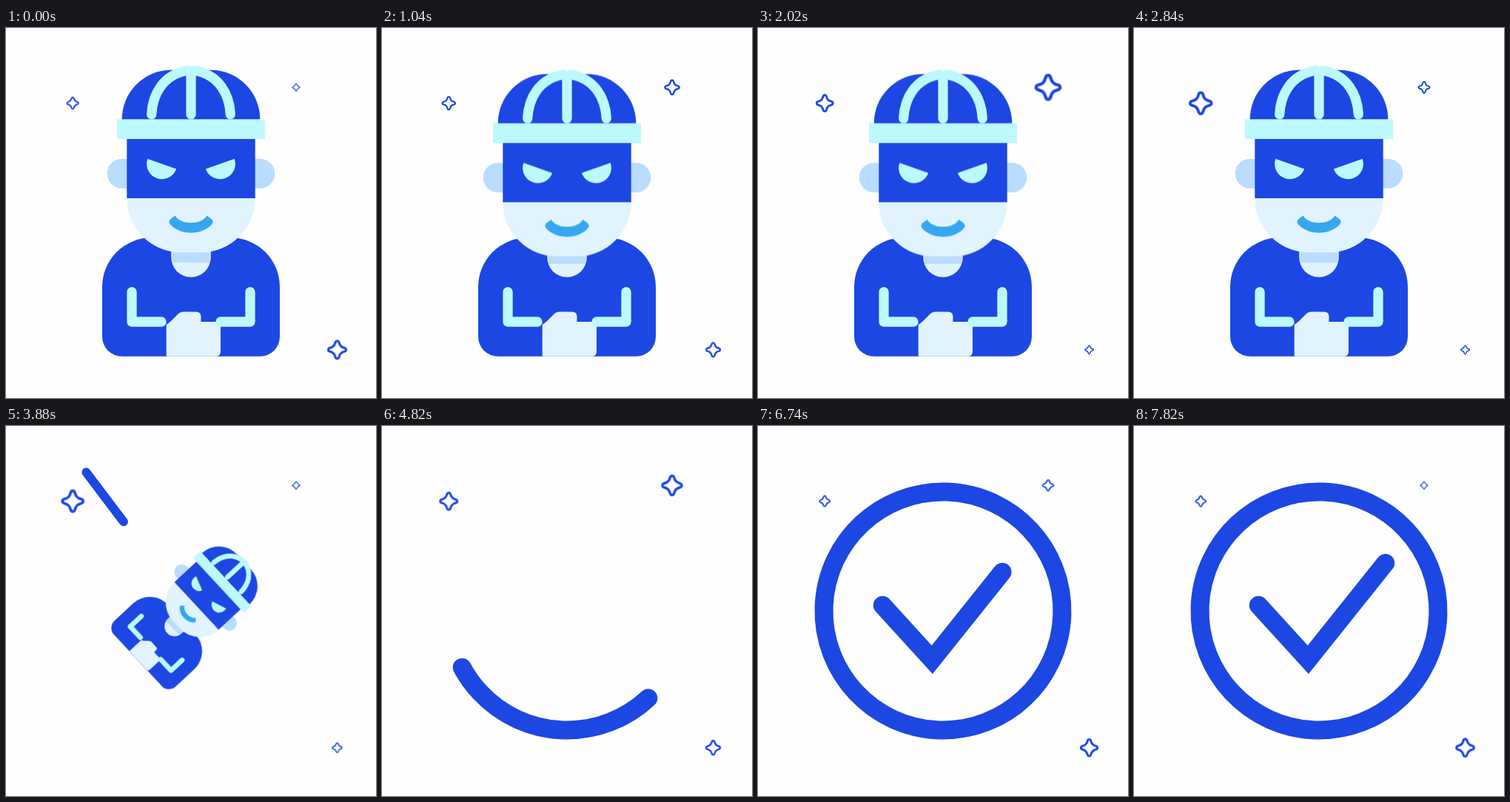
Write an HTML page that moves like this. It is 500x500 px and loops after 7.84 s.

```html
<!DOCTYPE html>
<html lang="en">
<head>
<meta charset="utf-8">
<title>Thief caught</title>
<style>
  :root { --blue: #1c47e3; --cyan: #bef8ff; --skin: #e0f3ff; --shade: #b9dcff; }
  html, body { margin: 0; width: 100%; height: 100%; overflow: hidden; background: #fefefe; }
  svg { display: block; width: 100%; height: 100%; }
  .blue { fill: var(--blue); }
  .cyan { fill: var(--cyan); }
  .skin { fill: var(--skin); }
  .shade { fill: var(--shade); }
  .line { fill: none; stroke: var(--blue); stroke-linecap: round; }
  .trim { stroke: var(--cyan); stroke-width: 13.3; stroke-linejoin: round; }

  .thief, .head, .collar, .streak, .ring, .check {
    animation: 7.84s linear infinite;
  }
  .thief { transform-origin: 250px 250px; animation-name: vanish; }
  .head { --nod: 5.4px; animation-name: nod; }
  .collar { --nod: 1.7px; animation-name: nod; }
  .streak { stroke-width: 12; animation-name: slash; }
  .ring { stroke-width: 25; stroke-dasharray: 1 2; animation-name: ring; }
  .check { stroke-width: 25; stroke-dasharray: 1 2; animation-name: check; }

  @keyframes nod {
    0%, 18.11%, 36.22%, 100% { transform: none; animation-timing-function: ease-in-out; }
    6.34%, 13.4%, 24.45%, 31.5% { transform: translateY(var(--nod)); animation-timing-function: ease-in-out; }
  }
  @keyframes vanish {
    0%, 41.07% { transform: rotate(0deg) scale(1); animation-timing-function: ease-in-out; }
    44.39% { transform: rotate(0deg) scale(1.05); animation-timing-function: cubic-bezier(.37, 0, .63, 1); }
    54.39%, 100% { transform: rotate(91deg) scale(0); }
  }
  @keyframes slash {
    0%, 48.2% { visibility: hidden; stroke-dasharray: 0 2; stroke-dashoffset: 0; }
    48.21% { visibility: visible; stroke-dasharray: 0 2; stroke-dashoffset: 0; }
    49.49% { stroke-dasharray: .176 2; stroke-dashoffset: 0; }
    51.02% { stroke-dasharray: .38 2; stroke-dashoffset: -.18; }
    54.07% { visibility: visible; stroke-dasharray: 0 2; stroke-dashoffset: -1; }
    54.08%, 100% { visibility: hidden; stroke-dasharray: 0 2; stroke-dashoffset: -1; }
  }
  @keyframes ring {
    0%, 53.57% { stroke-dashoffset: 1.05; animation-timing-function: ease-in-out; }
    73.6%, 100% { stroke-dashoffset: 0; }
  }
  @keyframes check {
    0%, 75.5% { stroke-dashoffset: 1.1; animation-timing-function: ease-in-out; }
    88%, 100% { stroke-dashoffset: 0; }
  }
</style>
</head>
<body>
<svg viewBox="0 0 500 500">
  <defs>
    <path id="star" class="line" stroke-width="4.2" d="M0-16
      C2-16 3-14.5 3.5-12.5 C5-7 7-5 12.5-3.5 C14.5-3 16-2 16 0
      C16 2 14.5 3 12.5 3.5 C7 5 5 7 3.5 12.5 C3 14.5 2 16 0 16
      C-2 16-3 14.5-3.5 12.5 C-5 7-7 5-12.5 3.5 C-14.5 3-16 2-16 0
      C-16-2-14.5-3-12.5-3.5 C-7-5-5-7-3.5-12.5 C-3-14.5-2-16 0-16Z"/>
    <!-- one half of the paired features, mirrored for the other side -->
    <path id="ear" class="shade" d="M163.8 176.7H156.7A20 20 0 0 0 156.7 216.7H163.8Z"/>
    <path id="eye" class="cyan" d="M191.3 176.7L230.2 190.6A20.6 20.6 0 0 1 191.3 176.7Z"/>
    <path id="rib" class="line trim" d="M196.7 116.7C198 90 212 63 245 57.5"/>
    <path id="arm" class="line trim" d="M170 356.7V397H210"/>
  </defs>

  <g class="thief">
    <path class="blue" d="M130 417V350A66.7 66.7 0 0 1 196.7 283.3H303.3A66.7 66.7 0 0 1 370 350V417
      A26.7 26.7 0 0 1 343.3 443.7H156.7A26.7 26.7 0 0 1 130 417Z"/>
    <path class="skin" d="M223.3 285H276.7V310A26.7 26.7 0 0 1 223.3 310Z"/>
    <rect class="shade collar" x="225" y="288" width="50" height="29"/>
    <path class="skin" d="M216.7 443.7V401L222.5 396.5L233 386Q235.5 383.5 239 383.5H257Q263.5 383.5 263.5 390V397
      H290V437Q290 443.7 283.3 443.7Z"/>
    <use href="#arm"/>
    <use href="#arm" transform="matrix(-1 0 0 1 500 0)"/>

    <g class="head">
      <use href="#ear"/>
      <use href="#ear" transform="matrix(-1 0 0 1 500 0)"/>
      <path class="skin" d="M163.3 229H336.7V230A73.3 73.3 0 0 1 263.4 303.3H236.6A73.3 73.3 0 0 1 163.3 230Z"/>
      <rect class="blue" x="163.3" y="149" width="173.4" height="81"/>
      <use href="#eye"/>
      <use href="#eye" transform="matrix(-1 0 0 1 500 0)"/>
      <path fill="#36a6f0" d="M228.5 253.5C236 266.5 264 266.5 271.5 253.5L277.5 258Q281.5 261.5 278 265.5
        C264 280.5 236 280.5 222 265.5Q218.5 261.5 222.5 258Z"/>
      <path class="blue" d="M156.7 124V123.3A66.7 66.7 0 0 1 223.3 56.7H276.7A66.7 66.7 0 0 1 343.3 123.3V124Z"/>
      <path class="line trim" d="M250 60V116.7"/>
      <use href="#rib"/>
      <use href="#rib" transform="matrix(-1 0 0 1 500 0)"/>
      <rect class="cyan" x="150" y="123.3" width="200" height="26.7"/>
    </g>
  </g>

  <path class="line streak" pathLength="1" d="M108 62L392 438"/>
  <circle class="line ring" pathLength="1" cx="250" cy="250" r="161" transform="rotate(47 250 250)"/>
  <path class="line check" pathLength="1" stroke-miterlimit="8" d="M168.3 242.3L235.3 315.7L339.7 185.3"/>

  <g transform="translate(90.2 101.6)"><use id="left" href="#star"/></g>
  <g transform="translate(392 80.2)"><use id="top" href="#star"/></g>
  <g transform="translate(447.5 434.8)"><use id="low" href="#star"/></g>
</svg>
<script>
  const LOOP = 7840, STEPS = 196, FULL = 36.2;

  // Size swings between min and max; phase(t) counts cycles from a peak.
  function twinkle(id, min, max, phase) {
    const frames = Array.from({ length: STEPS + 1 }, (_, i) => {
      const swing = (1 + Math.cos(2 * Math.PI * phase(i / STEPS * LOOP))) / 2;
      return { transform: `scale(${(min + (max - min) * swing) / FULL})` };
    });
    document.getElementById(id).animate(frames, { duration: LOOP, iterations: Infinity });
  }

  twinkle('left', 16, 32.5, t => t / 1100 - .6);
  twinkle('top', 11, 37, t => t / 1303 - .52);
  // the last two cycles run slower so the star closes the loop
  twinkle('low', 11, 27.5, t => (t < 5775 ? t / 825 : 7 + (t - 5775) / 1032.5) - .05);
</script>
</body>
</html>
```
